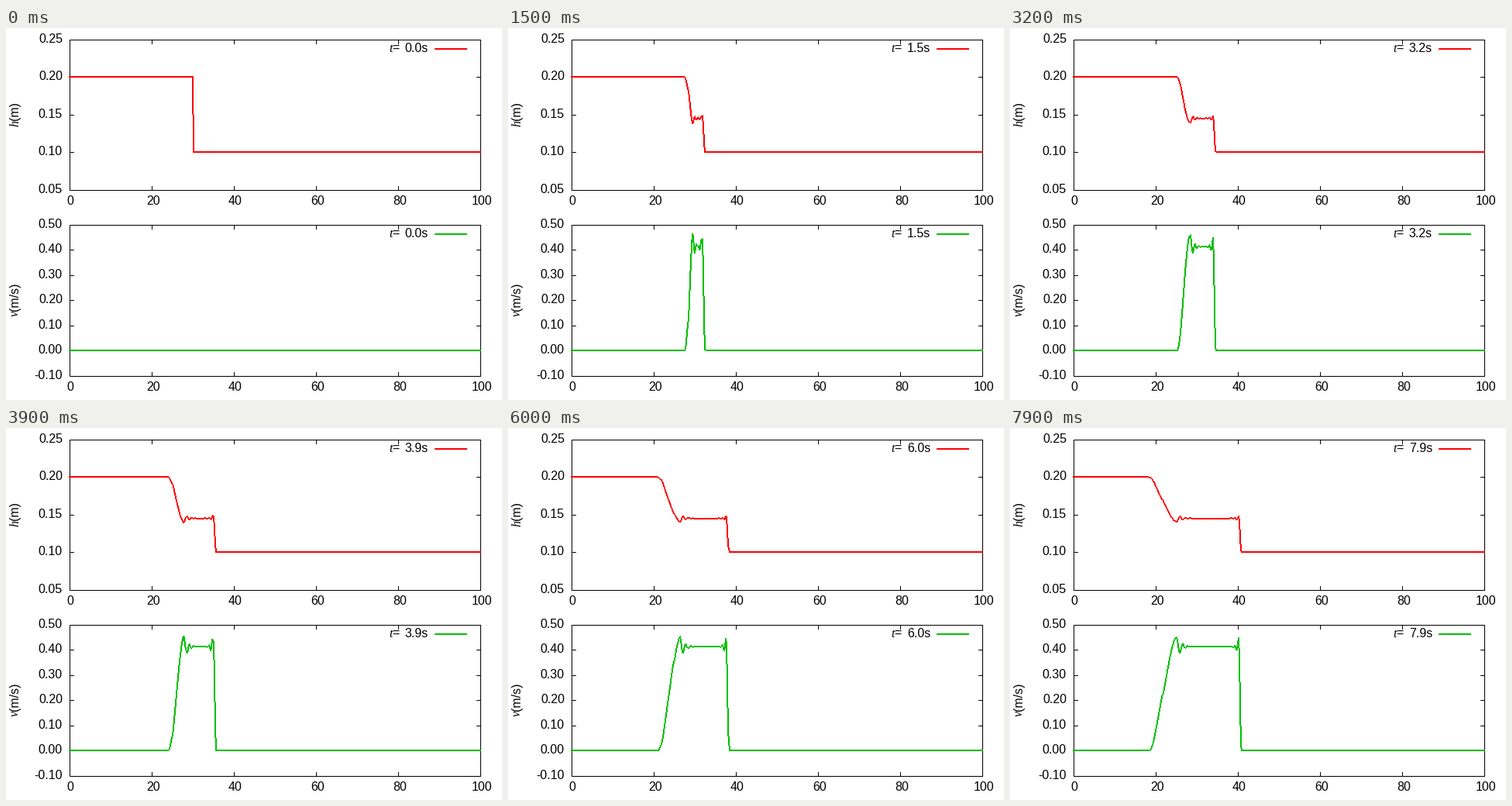
Recreate the animation shown at these times as a matplotlib script. Size 640 by 480 pixels, loop 8000 ms.

```python
import numpy as np
import matplotlib.pyplot as plt
from matplotlib.animation import FuncAnimation

W, H, DPI = 640, 480, 100
FRAMES, INTERVAL = 80, 100
PT = 72 / DPI                       # points per pixel

# Dam break: deep water on the left, shallow on the right
G, H0, H1 = 9.81, 0.2, 0.1
C0 = np.sqrt(G * H0)
V_MID = 0.4137                      # speed of the middle state
C_MID = C0 - V_MID / 2
SHOCK = 1.322                       # speed of the bore
X = np.arange(501) * 0.2

LEFT, RIGHT = 82, 612
TOP_PLOT = dict(top=15, bottom=209, lo=0.05, hi=0.25, step=0.05)
LOW_PLOT = dict(top=254, bottom=449, lo=-0.1, hi=0.5, step=0.1)
RED, GREEN = (255, 0, 0), (0, 192, 0)


def to_px(x):
    return np.floor(LEFT + (RIGHT - LEFT) * x / 100 + 0.5 + 1e-6).astype(int)


def to_py(y, p):
    scale = (p["bottom"] - p["top"]) / (p["hi"] - p["lo"])
    # slightly more than a half, so resting levels never flicker
    return np.ceil(p["bottom"] - (y - p["lo"]) * scale - 0.52).astype(int)


def fan(t):
    """Rarefaction with a rounded head, and dispersive ripples at its foot."""
    x0 = 30.1 + 0.5 * t * np.exp(-t)
    w = (0.0156 * t) ** (1 / 3)
    foot = 30 + (V_MID - C_MID) * t
    peak_x = foot + 2.338 * w
    amp = min(0.065, 0.0707 * t ** -0.31)
    peak_v = V_MID + amp

    # straight fan, bent tangentially into the first crest
    slope = 2 / (3 * t)
    line = 2 / 3 * (C0 + (X - x0) / t)
    excess = max(2 / 3 * (C0 + (peak_x - x0) / t) - peak_v, 0.01)
    s = np.maximum(peak_x - X, 0)
    join = 3 * excess / slope
    bend = peak_v - slope / (1.5 * np.sqrt(join)) * s ** 1.5
    u = np.where(s > join, line, bend)

    b = min(slope * (0.55 + 0.04 * t), 0.3)
    u = np.where(u < b, np.maximum(u + b, 0) ** 2 / (4 * b), u)

    # Airy-like phase: crests and troughs at whole n
    phase = 2 / 3 * np.maximum((X - foot) / w, 0) ** 1.5 + np.pi / 4
    n = phase / np.pi
    near = amp ** (2 - np.minimum(n, 2)) * 0.025 ** (np.minimum(n, 2) - 1)
    env = np.where(n < 2, near, 0.025 * 0.5 ** np.maximum(n - 2, 0))
    return np.where(X < peak_x, u, V_MID - env * np.cos(phase))


def state(t):
    if t == 0:
        return np.where(X < 30.1, H0, H1), np.zeros_like(X)
    v = fan(t)
    r = 30.1 + SHOCK * t - X        # distance behind the bore
    q = np.maximum(r - 0.4, 0) / 0.48
    ring = 0.036 * min(1, t / 0.5) * 0.41 ** q * np.cos(np.pi * q)
    f = np.clip((r + 0.35) / 0.68, 0, 1)
    front = f * f * (3 - 2 * f)
    h = (C0 - v / 2) ** 2 / G + ring / 9.05
    return H1 + (h - H1) * front, (v + ring) * front


fig = plt.figure(figsize=(W / DPI, H / DPI), dpi=DPI, facecolor="white")
ax = fig.add_axes([0, 0, 1, 1])
ax.axis("off")
canvas = np.zeros((H, W, 4), np.uint8)
layer = ax.imshow(canvas, extent=(0, W, H, 0), aspect="auto",
                  interpolation="nearest", zorder=4)
ax.set_xlim(0, W)
ax.set_ylim(H, 0)


def stroke(xs, ys, color="black", width=1):
    ax.plot(xs, ys, color=color, lw=width * PT, antialiased=False,
            solid_capstyle="butt", solid_joinstyle="miter")


def text(x, y, s, ha="left", serif=False, rotation=0):
    return ax.text(x, y, s, ha=ha, va="baseline", fontsize=16 * PT,
                   family="Liberation Serif" if serif else "Liberation Sans",
                   style="italic" if serif else "normal",
                   rotation=rotation, rotation_mode="anchor")


def panel(p, color, symbol, unit, label_y, symbol_w):
    """Draw the fixed parts and return the clock text."""
    top, bottom = p["top"], p["bottom"]
    stroke([LEFT, RIGHT, RIGHT, LEFT, LEFT], [top, top, bottom, bottom, top])

    for value in range(0, 101, 20):
        x, label = to_px(value), str(value)
        stroke([x, x], [top, top + 5])
        stroke([x, x], [bottom, bottom - 5])
        text(x + 0.8 - 4 * len(label), bottom + 19, label)
    for k in range(round((p["hi"] - p["lo"]) / p["step"]) + 1):
        value = round(p["lo"] + k * p["step"], 2) + 0.0
        y = to_py(value, p)
        stroke([LEFT, LEFT + 5], [y, y])
        stroke([RIGHT, RIGHT - 5], [y, y])
        text(73, y + 4, f"{value:.2f}", ha="right")

    text(16, label_y, symbol, serif=True, rotation=90)
    text(16, label_y - symbol_w, unit, rotation=90)

    text(494, top + 16, "t", serif=True)
    text(498, top + 16, "=")
    stroke([553, 595], [top + 12] * 2, np.array(color) / 255, 2)
    return text(545, top + 16, "", ha="right")


def paint(xs, ys, color):
    """Stepped two-pixel line: thick across its shorter direction."""
    rgba = (*color, 255)
    for x0, y0, dx, dy in zip(xs[:-1], ys[:-1], np.diff(xs), np.diff(ys)):
        n = max(abs(dx), abs(dy))
        k = np.arange(n + 1) / n
        px = np.floor(x0 + dx * k + 0.5).astype(int)
        py = np.floor(y0 + dy * k + 0.5).astype(int)
        canvas[py, px] = rgba
        if abs(dy) > abs(dx):
            canvas[py, px - 1] = rgba
        else:
            canvas[py - 1, px] = rgba


plots = [(TOP_PLOT, RED, panel(TOP_PLOT, RED, "h", "(m)", 127, 8)),
         (LOW_PLOT, GREEN, panel(LOW_PLOT, GREEN, "v", "(m/s)", 372, 7.1))]
PX = to_px(X)
PX[0] -= 1                          # line cap over the left border


def update(i):
    t = i / 10
    canvas[:] = 0
    for values, (p, color, clock) in zip(state(t), plots):
        paint(PX, to_py(values, p), color)
        clock.set_text(f"{t:.1f}s")
    layer.set_data(canvas)
    return [layer] + [clock for *_, clock in plots]


anim = FuncAnimation(fig, update, frames=FRAMES, interval=INTERVAL,
                     repeat=True, repeat_delay=0, blit=False)
plt.show()
```
